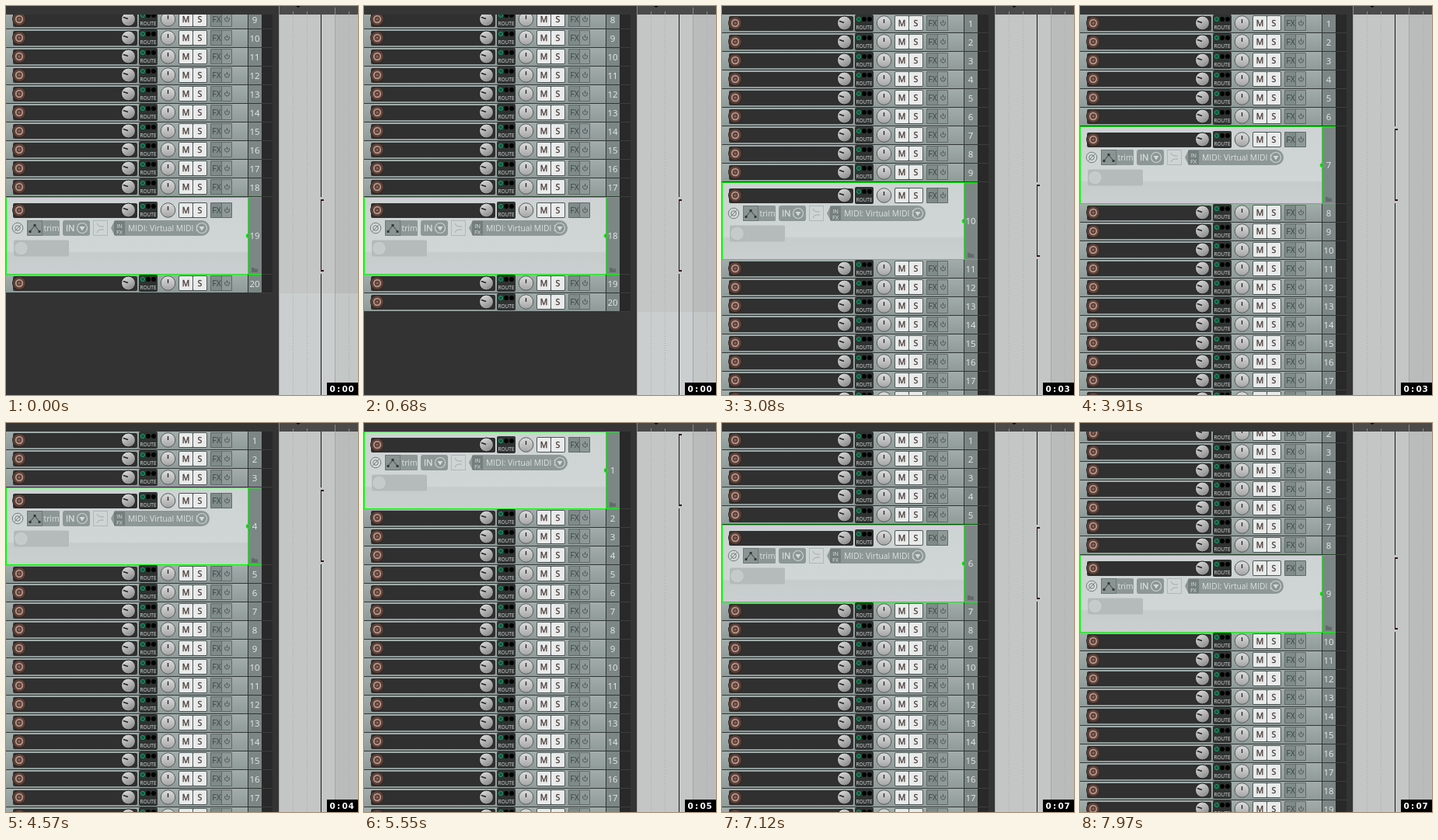
Recreate the animation shown at these times as an HTML page. Size 453 by 501 pixels, loop 8 s.

```html
<!DOCTYPE html>
<html lang="en">
<head>
<meta charset="utf-8">
<title>Track list</title>
<style>
html, body { margin: 0; width: 100%; height: 100%; overflow: hidden; background: #333; }
svg { display: block; width: 453px; height: 501px; }
text { font-family: "Open Sans", "Noto Sans", sans-serif; }
.mid { text-anchor: middle; }
.num { font-size: 11.5px; fill: #e6eaea; }
.pale { fill: #dce1e1; font-size: 10.3px; }
.clock { font: bold 10.5px "DejaVu Sans", sans-serif; fill: #fff; }
</style>
</head>
<body>
<svg viewBox="0 0 453 501">
  <defs>
    <clipPath id="view"><rect y="11" width="351" height="490"/></clipPath>
    <linearGradient id="rowFill" x2="0" y2="1">
      <stop stop-color="#a2adab"/><stop offset="1" stop-color="#8f9b99"/>
    </linearGradient>
    <linearGradient id="bigFill" x2="0" y2="1">
      <stop stop-color="#cdd3d3"/><stop offset=".7" stop-color="#d0d5d5"/>
      <stop offset=".72" stop-color="#c6cbcb"/><stop offset="1" stop-color="#cacfcf"/>
    </linearGradient>
    <linearGradient id="knobFill" x2="0" y2="1">
      <stop stop-color="#dedede"/><stop offset="1" stop-color="#a4a4a4"/>
    </linearGradient>
    <linearGradient id="volumeFill" x2=".6" y2="1">
      <stop stop-color="#e6e6e6"/><stop offset="1" stop-color="#8c8c8c"/>
    </linearGradient>

    <g id="smallBg">
      <rect width="312" height="23" fill="url(#rowFill)"/>
      <rect x="312" width="17" height="23" fill="#7c8785"/>
      <rect x="329" width="14" height="24" fill="#292929"/>
      <path d="M311.500 0V24M0 23.500H329" stroke="#303635"/>
      <path d="M329 23.500H343" stroke="#3d3d3d"/>
    </g>

    <g id="controls">
      <rect x="9" y="-9" width="160" height="19" rx="2" fill="#303030"/>
      <circle cx="17" r="9" fill="#2e2522"/>
      <circle cx="17" r="8" fill="#5c4038"/>
      <circle cx="17" r="4.300" fill="#5c4038" stroke="#b8998d" stroke-width="1.700"/>
      <circle cx="17" r="1.500" fill="#8a685d"/>
      <circle cx="157.500" r="9" fill="url(#volumeFill)" stroke="#1e1e1e"/>
      <path d="M151-2.500L157-.5" stroke="#222" stroke-width="1.500"/>
      <rect x="171" y="-11" width="24" height="22" rx="2" fill="#2e3231"/>
      <circle cx="176" cy="-5" r="2.600" fill="#0b5a3a" stroke="#1f9a66"/>
      <circle cx="183" cy="-5" r="3"/>
      <circle cx="190" cy="-5" r="3"/>
      <text class="mid" x="183" y="8" font-size="6.500" fill="#e4e4e4">ROUTE</text>
      <circle cx="208.500" r="9.300" fill="url(#knobFill)" stroke="#555c5b"/>
      <path d="M208.500-5V0" stroke="#222" stroke-width="1.300"/>
      <rect x="222" y="-10" width="37" height="20" rx="2" fill="#4f5756"/>
      <rect x="223" y="-9" width="17" height="18" rx="1" fill="#e9ebeb"/>
      <rect x="241" y="-9" width="17" height="18" rx="1" fill="#e9ebeb"/>
      <g class="mid" font-size="10.500" fill="#43342f" stroke="#43342f" stroke-width=".3">
        <text x="231.500" y="4">M</text><text x="249.500" y="4">S</text>
      </g>
      <rect x="263" y="-10" width="28" height="20" rx="1" fill="#606b69"/>
      <rect x="264" y="-9" width="13" height="18" fill="#7f8b89"/>
      <rect x="278" y="-9" width="12" height="18" fill="#8f9a98"/>
      <text class="mid" x="271" y="4" font-size="10.500" fill="#3c4443">FX</text>
      <path d="M282.500-2A2.900 2.900 0 1 0 286.500-2M284.500-4V0" fill="none" stroke="#4a5352"/>
    </g>

    <g id="drop">
      <circle r="6.500" fill="#8b9694" stroke="#cbd1d1" stroke-width="1.200"/>
      <path d="M-3.500-2H3.500L0 3.500Z" fill="#d3d9d9"/>
    </g>

    <g id="bigBg">
      <rect width="312" height="100" fill="url(#bigFill)"/>
      <rect x="312" width="17" height="100" fill="#7c8785"/>
      <rect x="329" width="14" height="100" fill="#292929"/>
      <path d="M329 99.500H343" stroke="#3d3d3d"/>
      <g transform="translate(0 40)">
        <circle cx="15" r="6.800" fill="#d3d8d8" stroke="#737d7b"/>
        <circle cx="15" r="3.300" fill="none" stroke="#737d7b"/>
        <path d="M10.500 4.500L19.500-4.500" stroke="#737d7b"/>
        <rect x="27" y="-10" width="42" height="20" rx="1.500" fill="#8d9896"/>
        <rect x="27.500" y="-9.500" width="19" height="19" fill="#8a9593" stroke="#6d7876"/>
        <path d="M31 4L37-3L43 4" fill="none" stroke="#3a4342"/>
        <path d="M29.500 3h3v3h-3zM35.500-5h3v3h-3zM41.500 3h3v3h-3z" fill="#303837"/>
        <text class="pale" x="48.500" y="4">trim</text>
        <rect x="73" y="-10" width="35" height="20" rx="3" fill="#8d9896"/>
        <text class="pale" x="77" y="4" style="font-size:11px" stroke="#dce1e1" stroke-width=".3">IN</text>
        <use href="#drop" x="98"/>
        <rect x="112.500" y="-9.500" width="18" height="19" fill="none" stroke="#b0b7b6"/>
        <path d="M117-6Q118-2 122-2H126M117 6Q118 2 122 2H126" fill="none" stroke="#a4acab"/>
        <path d="M135 0L140-10H252A10 10 0 0 1 252 10H140Z" fill="#8d9896"/>
        <rect x="139" y="-9" width="14" height="18" fill="#747f7d"/>
        <g class="mid" font-size="7.500" fill="#dce1e1">
          <text x="146" y="-.5">IN</text><text x="146" y="7.500">FX</text>
        </g>
        <text class="pale" x="157" y="4">MIDI: Virtual MIDI k</text>
        <use href="#drop" x="252"/>
      </g>
      <rect x="10" y="55.500" width="71" height="21" rx="2" fill="#b5bbbb"/>
      <circle cx="19.500" cy="66" r="9" fill="#c5caca" stroke="#b0b6b6"/>
      <path d="M316 91h3l1 1.500h4V97h-8z" fill="#616c6a"/>
    </g>
  </defs>

  <rect width="453" height="501" fill="#333"/>
  <g id="list" clip-path="url(#view)"></g>
  <rect width="351" height="11" fill="#353535"/>
  <rect x="343" y="11" width="8" height="490" fill="#343434"/>

  <rect x="351" width="102" height="11" fill="#4b4b4b"/>
  <path d="M351.500 0V11M369.500 7V11M387.500 7V11M423.500 2V11M441.500 7V11" stroke="#8b8b8b"/>
  <path d="M373 0H379L376 2Z"/>
  <rect x="351" y="11" width="72" height="490" fill="#c4c6c5"/>
  <rect x="423" y="11" width="30" height="490" fill="#b9bcbb"/>
  <rect id="empty" x="351" width="102" height="501" fill="#d5dddd" opacity=".35"/>
  <path d="M351.500 11V501M423.500 11V501" stroke="#a4a6a5"/>
  <path d="M369.500 11V501M387.500 11V501M441.500 11V501" stroke="#a9abaa" stroke-dasharray="1 2"/>
  <path d="M405.500 11V501" stroke="#161616"/>
  <g id="mark">
    <path d="M405 1.500h1M405 97.500h1" stroke="#c4c6c5" stroke-width="3"/>
    <path d="M405 4H409M405 95H409" stroke="#34141a" stroke-width="2"/>
  </g>
  <rect x="413" y="485" width="40" height="16"/>
  <text class="clock" id="clock" x="416.500 426 432.500 440.500" y="496.500"></text>
</svg>
<script>
const LOOP = 8000, COUNT = 20, TOP = 11, ROW = 24, BIG = 100, TURN = 5920;
// moments when the selection goes one track up, then one track down
const ups = [530, 860, 1300, 1580, 1700, 1980, 2380, 2810, 2950, 3330, 3480,
  3760, 4030, 4300, 4570, 4850, 5270, 5550];
const downs = [TURN, 6350, 6500, 6780, 7000, 7270, 7670, 7970];
const seconds = [1030, 2180, 3080, 4030, 5130, 6040, 7120];

const $ = id => document.getElementById(id);
const passed = (list, t) => list.filter(x => x <= t).length;
const move = (el, y) => el.setAttribute('transform', `translate(0 ${y})`);

const rows = Array.from({ length: COUNT }, (_, i) => {
  const g = document.createElementNS('http://www.w3.org/2000/svg', 'g');
  g.innerHTML = `<use/><use href="#controls"/>
    <text class="num mid" x="320">${i + 1}</text>`;
  $('list').append(g);
  const [bg, controls, num] = g.children;
  return { g, bg, controls, num };
});
$('list').insertAdjacentHTML('beforeend', `<g id="frame">
  <path d="M.5 0V100M311.500 0V100M0 .5H329M0 99.500H329" stroke="#0f0"/>
  <circle cx="311.500" cy="50" r="2.500" fill="#5a9a5a" stroke="#0f0"/></g>`);

function draw(t) {
  const sel = 19 - passed(ups, t) + passed(downs, t);
  // moving down, scrolling happens while the previous track is still tall
  const scroll = Math.max(0, ROW * sel - (t >= TURN ? 183 : 259));
  let y = TOP - scroll;
  rows.forEach((r, i) => {
    const big = i + 1 === sel;
    move(r.g, y);
    r.bg.setAttribute('href', big ? '#bigBg' : '#smallBg');
    move(r.controls, big ? 17 : 11);
    r.num.setAttribute('y', big ? 54 : 15.5);
    if (big) {
      move($('frame'), y);
      move($('mark'), y);
    }
    y += big ? BIG : ROW;
  });
  $('empty').setAttribute('y', y);
  $('clock').textContent = '0:0' + passed(seconds, t);
}

function tick() {
  draw(performance.now() % LOOP);
  requestAnimationFrame(tick);
}
tick();
</script>
</body>
</html>
```
